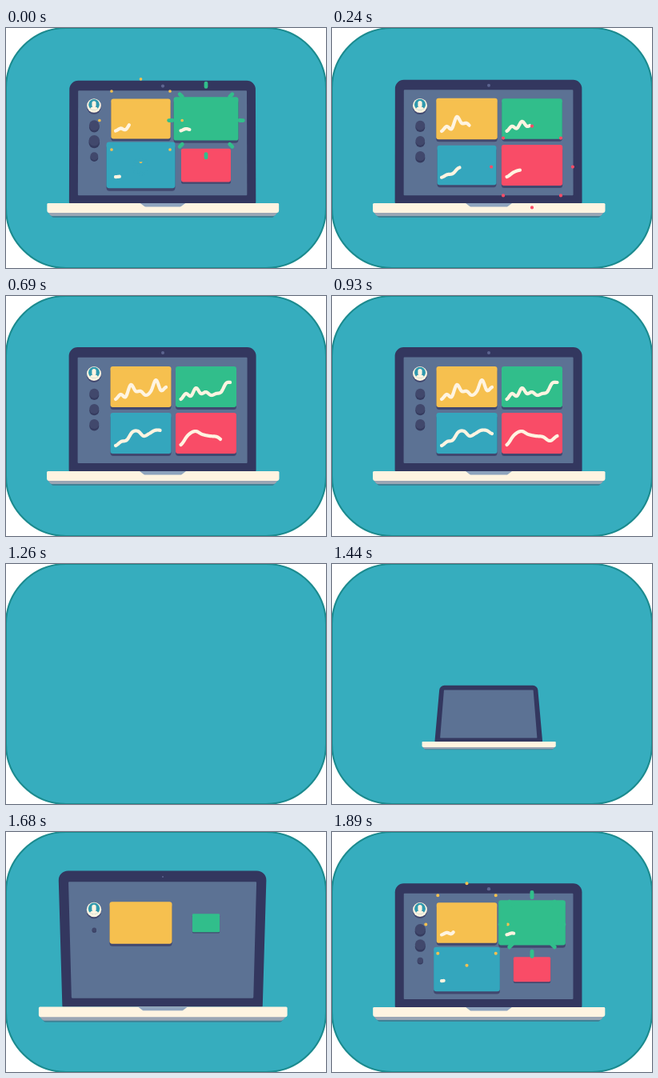
These frames come from a looping animation (400x300 px, 1.92 s). An HTML page with a canvas:

```html
<!DOCTYPE html>
<html lang="en">
<head>
<meta charset="utf-8">
<title>Laptop dashboard</title>
<style>
html, body { margin: 0; width: 100%; height: 100%; overflow: hidden; background: #fff; }
canvas { display: block; width: 400px; height: 300px; }
</style>
</head>
<body>
<canvas id="stage" width="400" height="300"></canvas>
<script>
const ctx = document.getElementById('stage').getContext('2d');
const LOOP = 1920, STEP = 30, INTRO = 1260;
const CREAM = '#fff4e1', TEAL = '#36adbe', NAVY = '#33375f', SCREEN = '#5c7294', SHADE = '#41486f';

// Each graph is a few evenly spaced heights above its baseline
const cards = [
  ['#f6c04f', [-1, 5, 2, 17, 9, 9, 4, 9, 23, 10, 14]],
  ['#31be8b', [-1, 6, 3, 13, 6, 8, 4, 6, 8, 19, 20]],
  ['#34a6bd', [-1, 4, 6, 16, 17, 11, 14, 18, 18, 14]],
  ['#f94c67', [0, 12, 17, 13, 11, 10, 5, 11]]
].map(([color, heights], i) => ({
  color, heights,
  x: 168.5 + 81.5 * (i % 2),
  y: 114 + 58 * (i >> 1),
  start: 228 + 94 * i,
  line: 430 + 82 * i
}));

// Eases from 0 to 1 in `rise` ms, then swings on and dies away without a jump in speed
function spring(t, rise, swing, decay, half) {
  if (t <= 0) return 0;
  const u = t / rise, w = Math.PI / half, m = swing * w * rise;
  if (u < 1) return u * u * (3 - m - (2 - m) * u);
  const s = t - rise;
  return 1 + swing * Math.exp(-decay * s) * Math.sin(w * s);
}

const pop = age => spring(age, 185, .26, .0073, 210);
const size = e => spring(e, 282, .32, .0108, 330);
const lean = e => .83 + .17 * spring(e, 300, .47, .005, 330);

function box(x, y, w, h, r, color) {
  ctx.fillStyle = color;
  ctx.beginPath();
  ctx.roundRect(x, y, w, h, r);
  ctx.fill();
}

function disc(x, y, r, color) {
  ctx.fillStyle = color;
  ctx.beginPath();
  ctx.arc(x, y, r, 0, Math.PI * 2);
  ctx.fill();
}

// Symmetric trapezoid with rounded top and bottom corners
function trapezoid(x, top, bottom, wTop, wBottom, rTop, rBottom, color) {
  ctx.fillStyle = color;
  ctx.beginPath();
  ctx.moveTo(x, top);
  ctx.arcTo(x + wTop, top, x + wBottom, bottom, rTop);
  ctx.arcTo(x + wBottom, bottom, x, bottom, rBottom);
  ctx.arcTo(x - wBottom, bottom, x - wTop, top, rBottom);
  ctx.arcTo(x - wTop, top, x, top, rTop);
  ctx.closePath();
  ctx.fill();
}

function scaled(x, y, s, draw) {
  if (s <= 0) return;
  ctx.save();
  ctx.translate(x, y);
  ctx.scale(s, s);
  draw();
  ctx.restore();
}

function backdrop() {
  ctx.clearRect(0, 0, 400, 300);
  box(0, 0, 400, 300, 75, TEAL);
  ctx.strokeStyle = '#1b8a8e';
  ctx.lineWidth = 2;
  ctx.stroke();
}

// Local origin is the middle of the base
function laptop(e) {
  const tilt = lean(e) - 1;
  const height = 155 * (1 + tilt * (tilt > 0 ? .65 : 2.3));
  const panel = (from, to, w, r, color) => trapezoid(-.4, -7 - height * to, -7 - height * from,
    w * (1 + tilt * to), w * (1 + tilt * from), r, 1, color);
  scaled(196, 226, size(e), () => {
    panel(0, 1, 117, 11, NAVY);
    panel(.064, .919, 106, 1, SCREEN);
    scaled(0, -7 - height * .955, pop(e - cards[1].start), () => disc(0, 0, 2, '#5d6590'));
    trapezoid(0, 4, 11, 144, 138, 1, 3, '#3f8296');
    trapezoid(0, 3, 9, 145, 140, 1, 3, '#9aa5b4');
    box(-145, -7, 290.5, 12, [1.5, 1.5, 3, 3], CREAM);
    scaled(0, -7, Math.min(pop(e - cards[0].start), 1), () =>
      trapezoid(0, 0, 4.5, 29, 23, 0, 3, '#8ea3bd'));
  });
}

function avatar(e) {
  scaled(110, 97, pop(e - cards[0].start), () => {
    disc(0, 2, 9, SHADE);
    disc(0, 0, 9, CREAM);
    disc(0, -1.2, 7, '#3099ae');
    ctx.save();
    ctx.beginPath();
    ctx.arc(0, -1.2, 7, 0, Math.PI * 2);
    ctx.clip();
    box(-2.6, -6, 5.2, 8, 2.6, CREAM);
    ctx.beginPath();
    ctx.ellipse(0, 5, 5.2, 3.8, 0, 0, Math.PI * 2);
    ctx.fill();
    ctx.restore();
  });
}

function menu(e) {
  for (let i = 0; i < 3; i++) {
    scaled(110.3, 122.5 + 19.2 * i, pop(e - cards[i + 1].start), () => {
      disc(0, 1.5, 6, '#353b5f');
      disc(0, -.8, 6, '#41486c');
    });
  }
}

function card(c, e) {
  scaled(c.x, c.y, pop(e - c.start), () => {
    box(-38, -23, 76, 51, 3.5, SHADE);
    box(-38, -26, 76, 51, 3, c.color);
  });
}

function burst(c, e) {
  const q = (e - c.start - 230) / 220;
  if (q <= 0 || q >= 1) return;
  const width = 5.2 - 1.8 * q * q, cap = width / 2;
  const outer = 53.5 * (1 - (1 - q) ** 3.6) - cap;
  const inner = Math.min(outer, 53.5 * (1 - (1 - q) ** 2) + cap);
  ctx.strokeStyle = c.color;
  ctx.lineWidth = width;
  ctx.lineCap = 'round';
  ctx.beginPath();
  for (let i = 0; i < 8; i++) {
    const dx = Math.cos(i * Math.PI / 4), dy = Math.sin(i * Math.PI / 4);
    ctx.moveTo(c.x + dx * inner, c.y + 1.5 + dy * inner);
    ctx.lineTo(c.x + dx * outer, c.y + 1.5 + dy * outer + .01);
  }
  ctx.stroke();
}

// Smooth curve through the heights, p from 0 to 1
function curve(heights, p) {
  const n = heights.length - 1;
  const i = Math.min(n - 1, Math.floor(p * n)), u = p * n - i;
  const [a, b, c, d] = [-1, 0, 1, 2].map(k => heights[Math.max(0, Math.min(n, i + k))]);
  return b + .5 * u * (c - a + u * (2 * a - 5 * b + 4 * c - d + u * (3 * (b - c) + d - a)));
}

function graph(c, e) {
  const age = e - c.line;
  if (age <= 0) return;
  const span = 63, grow = Math.min(1, age / 450);
  const head = Math.min(span, .0735 * age);
  const point = x => ctx.lineTo(c.x - 31.5 + x, c.y + 14 - grow * curve(c.heights, x / span));
  ctx.strokeStyle = CREAM;
  ctx.lineWidth = 4.2;
  ctx.lineCap = ctx.lineJoin = 'round';
  ctx.beginPath();
  for (let x = 0; x < head; x += .5) point(x);
  point(head);
  ctx.stroke();
}

function draw(now) {
  const t = Math.floor(now % LOOP / STEP) * STEP;
  const e = (t - INTRO + LOOP) % LOOP;
  backdrop();
  laptop(e);
  avatar(e);
  menu(e);
  for (const part of [card, graph, burst]) cards.forEach(c => part(c, e));
}

const begin = performance.now();
function tick() {
  draw(performance.now() - begin);
  requestAnimationFrame(tick);
}
tick();
</script>
</body>
</html>
```
